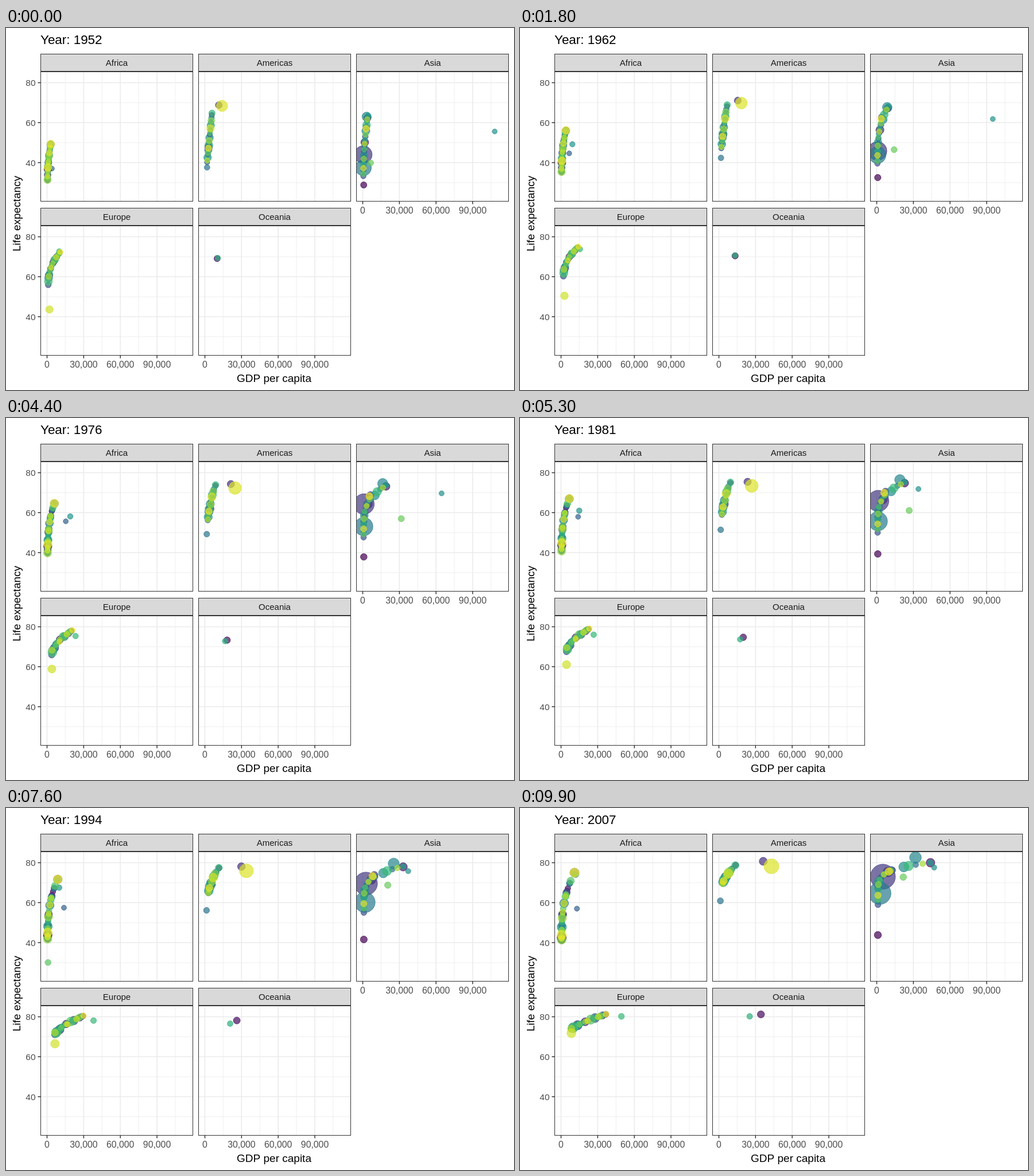
Recreate the animation shown at these times as an HTML page with a canvas. Size 885 by 632 pixels, loop 10000 ms.

```html
<!DOCTYPE html>
<html lang="en">
<head>
<meta charset="utf-8">
<title>Life expectancy and GDP per capita</title>
<style>
html, body { margin: 0; width: 100%; height: 100%; overflow: hidden; background: #fff; }
canvas { display: block; }
</style>
</head>
<body>
<canvas id="stage" width="885" height="632"></canvas>
<script>
const ctx = document.getElementById('stage').getContext('2d');
const FRAMES = 100, STEP = 100, FIRST = 1952, SPAN = 55;
const W = 266, H = 227;
const VIRIDIS = ['440154', '482878', '3e4a89', '31688e', '26828e', '1f9e89', '35b779', '6dcd59', 'b4de2c', 'fde725']
  .map(h => [0, 2, 4].map(i => parseInt(h.slice(i, i + 2), 16)));

// Crowd of each panel: ranges [low, high, skew] of life expectancy and GDP (thousands)
// at both ends of the period, and how far life expectancy runs ahead half way.
const PANELS = [
  { name: 'Africa', count: 49, life: [[31, 50, 1], [41, 75, 1.8]], gdp: [[.4, 3.2, 2], [.5, 11, 5]], lead: 4 },
  { name: 'Americas', count: 22, life: [[40, 66, 1], [69, 79, 1]], gdp: [[1.8, 6, 1], [3, 14, 1.5]], lead: 3 },
  { name: 'Asia', count: 26, life: [[33, 65, 1], [59, 80, .6]], gdp: [[.5, 4.5, 2], [1, 44, 4]], lead: 3 },
  { name: 'Europe', count: 28, life: [[55, 72.5, .6], [72.5, 81.5, .7]], gdp: [[1, 11, 1.5], [6, 38, 1]], lead: 2 },
  { name: 'Oceania', count: 0 }
];

// Countries that stand out: panel, hue, population (millions), then evenly spaced GDP and life values.
const LEADERS = {
  Libya: [0, .52, 3, [2, 10, 21, 12, 9.5, 12], [43, 60, 74]],
  Gabon: [0, .31, .7, [4, 7, 16, 13, 14, 13], [37, 58, 57]],
  Rwanda: [0, .74, 5, [.5, .9], [40, 44, 46, 46, 27, 46]],
  Canada: [1, .14, 24, [11.4, 22.5, 36.3], [68.8, 75, 80.7]],
  Haiti: [1, .38, 5, [1.8, 1.2], [37.6, 50.7, 60.9]],
  UnitedStates: [1, .95, 218, [14, 22, 30, 43], [68.4, 71, 75, 78.2]],
  Afghanistan: [2, 0, 14, [.8, .9], [28.8, 39, 43.8]],
  China: [2, .17, 856, [.4, .7, 1.5, 5], [44, 46, 63.5, 67, 70, 73]],
  India: [2, .41, 643, [.5, .8, 2.5], [37.4, 55, 64.7]],
  Japan: [2, .46, 105, [3.2, 18, 31.7], [63, 76, 82.6]],
  Kuwait: [2, .5, 1, [108, 113, 95, 81, 109, 59, 31, 28, 35, 40, 35, 47], [55.6, 67, 75, 77.6]],
  SaudiArabia: [2, .77, 9, [6.5, 15, 34, 23, 20, 21.7], [39.9, 52, 67, 72.8]],
  Norway: [3, .67, 4, [10, 25, 49.4], [72.7, 75.7, 80.2]],
  Turkey: [3, .93, 40, [2, 4.2, 8.5], [43.6, 56.2, 64.2, 71.8]],
  Australia: [4, .03, 13.5, [10, 16, 22.5, 34.4], [69.1, 71.6, 76.8, 81.2]],
  NewZealand: [4, .63, 2.9, [10.6, 15.4, 18.7, 25.2], [69.4, 71.7, 75, 80.2]]
};

let seed = 7;
const random = () => (seed = seed * 16807 % 2147483647) / 2147483647;
const mix = (a, b, f) => a + (b - a) * f;
const clamp = v => Math.min(1, Math.max(0, v));
const spread = ([low, high, skew], q) => mix(low, high, q ** skew);

// Value of evenly spaced knots at u in 0..1.
function at(knots, u) {
  const p = u * (knots.length - 1), i = Math.min(Math.floor(p), knots.length - 2);
  return mix(knots[i], knots[i + 1], p - i);
}

function viridis(u) {
  const p = u * (VIRIDIS.length - 1), i = Math.min(Math.floor(p), VIRIDIS.length - 2);
  return `rgba(${VIRIDIS[i].map((c, j) => Math.round(mix(c, VIRIDIS[i + 1][j], p - i)))},0.7)`;
}

const dots = Object.values(LEADERS).map(([panel, hue, people, gdp, life]) =>
  ({ panel, hue, people, gdp: u => at(gdp, u), life: u => at(life, u) }));

PANELS.forEach(({ count, life, gdp, lead }, panel) => {
  for (let i = 0; i < count; i++) {
    const before = (i * .618 + .3) % 1;
    const after = clamp(before + (random() - .5) * .25);
    const ends = ranges => [spread(ranges[0], before), spread(ranges[1], after)];
    const lifeEnds = ends(life), gdpEnds = ends(gdp);
    dots.push({
      panel,
      hue: (i + .5) / count,
      people: 2 + 60 * random() ** 4,
      gdp: u => at(gdpEnds, u ** 1.2),
      life: u => at(lifeEnds, u) + lead * Math.sin(Math.PI * u)
    });
  }
});
dots.sort((a, b) => a.hue - b.hue);

const xOf = gdp => 11.5 + 2.128 * gdp;
const yOf = life => 19.5 + 3.488 * (80 - life);

function line(x1, y1, x2, y2, colour, width) {
  ctx.strokeStyle = colour;
  ctx.lineWidth = width;
  ctx.beginPath();
  ctx.moveTo(x1, y1);
  ctx.lineTo(x2, y2);
  ctx.stroke();
}

function text(str, x, y, size, colour = '#000', align = 'center') {
  ctx.font = `${size}px "Liberation Sans", Arial, sans-serif`;
  ctx.fillStyle = colour;
  ctx.textAlign = align;
  ctx.fillText(str, x, y);
}

function drawDot(d, u) {
  const people = d.people * 2.4 ** (u - .5);
  ctx.beginPath();
  ctx.arc(xOf(d.gdp(u)), yOf(d.life(u)), 4 + 17.8 * Math.sqrt(people / 1319), 0, 2 * Math.PI);
  ctx.fillStyle = ctx.strokeStyle = viridis(d.hue);
  ctx.lineWidth = 1;
  ctx.fill();
  ctx.stroke();
}

function drawPanel(i, u) {
  const col = i % 3, row = Math.floor(i / 3);
  ctx.save();
  ctx.translate(60 + 275 * col, 76 + 269 * row);

  ctx.save();
  ctx.beginPath();
  ctx.rect(0, 0, W, H);
  ctx.clip();
  for (const [shift, width] of [[15, .8], [0, 1.6]]) {
    for (let g = shift; g < 110; g += 30) line(xOf(g), 0, xOf(g), H, '#ebebeb', width);
    for (let l = shift ? 30 : 40; l < 85; l += 20) line(0, yOf(l), W, yOf(l), '#ebebeb', width);
  }
  for (const d of dots) if (d.panel === i) drawDot(d, u);
  ctx.restore();

  ctx.fillStyle = '#d9d9d9';
  ctx.fillRect(0, -31, W, 31);
  ctx.strokeStyle = '#333';
  ctx.lineWidth = 1;
  ctx.strokeRect(.5, -30.5, W - 1, 30);
  ctx.strokeRect(.5, .5, W - 1, H - 1);
  text(PANELS[i].name, W / 2, -10, 15, '#1a1a1a');

  if (col === 0) for (const l of [40, 60, 80]) {
    line(-4.6, yOf(l), 0, yOf(l), '#333', 1.5);
    text(l, -8.5, Math.round(yOf(l) + 5.5), 15.5, '#4d4d4d', 'right');
  }
  if (i > 1) for (const g of [0, 30, 60, 90]) {
    line(xOf(g), H, xOf(g), H + 4.6, '#333', 1.5);
    text(g ? g + ',000' : '0', xOf(g), H + 21, 15.8, '#4d4d4d');
  }
  ctx.restore();
}

function draw(now) {
  const u = Math.floor(now / STEP) % FRAMES / (FRAMES - 1);
  ctx.fillStyle = '#fff';
  ctx.fillRect(0, 0, 885, 632);
  PANELS.forEach((_, i) => drawPanel(i, u));
  text('Year: ' + Math.round(FIRST + SPAN * u), 60, 28, 22.4, '#000', 'left');
  text('GDP per capita', 467, 618, 19);
  ctx.save();
  ctx.translate(25, 324);
  ctx.rotate(-Math.PI / 2);
  text('Life expectancy', 0, 0, 19);
  ctx.restore();
}

const start = performance.now();
function tick() {
  draw(performance.now() - start);
  requestAnimationFrame(tick);
}
tick();
</script>
</body>
</html>
```
